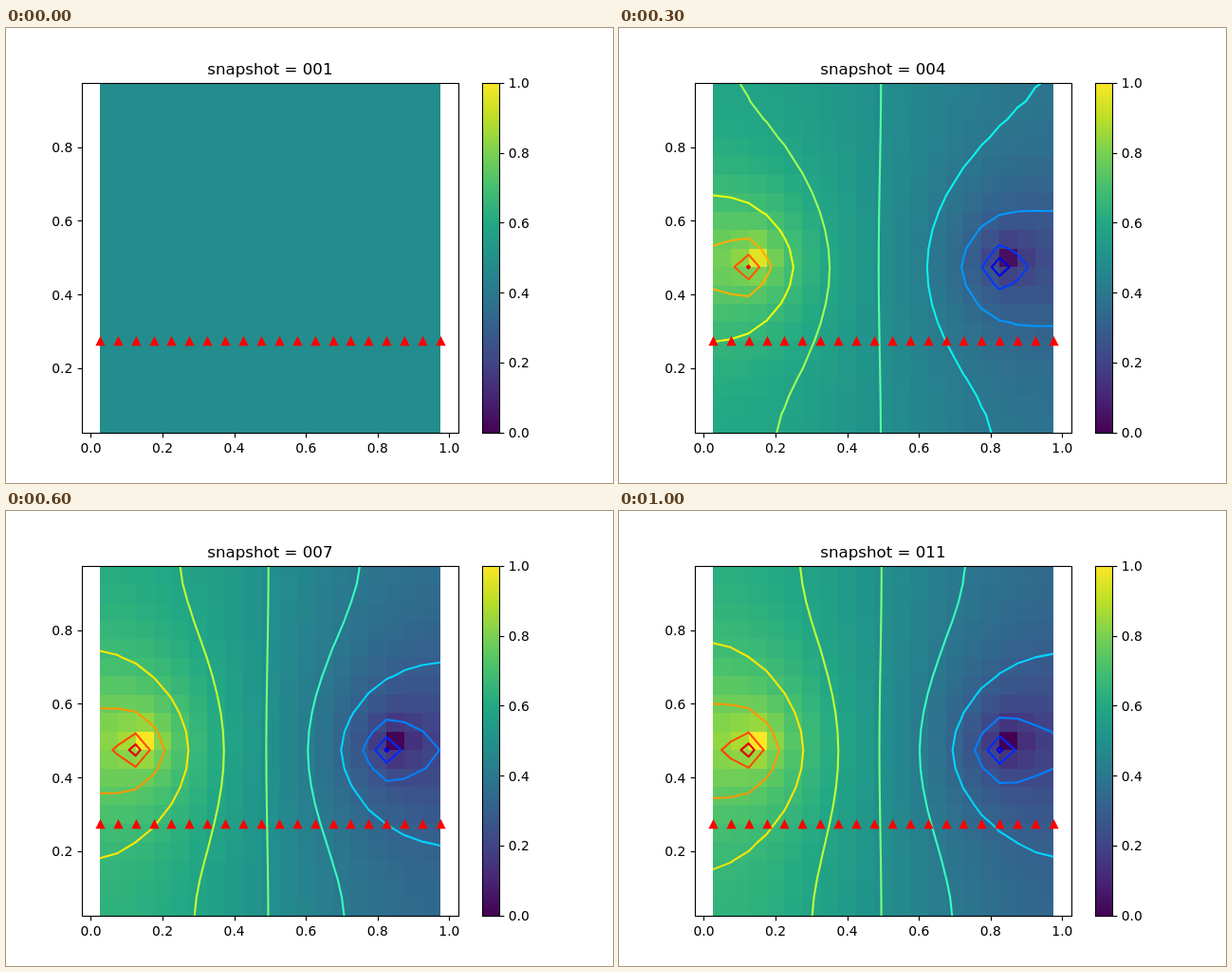
Animation of 640x480 px, one loop 1100 ms. Source, as an HTML page with a canvas:

```html
<!DOCTYPE html>
<html lang="en">
<head>
<meta charset="utf-8">
<title>Diffusion snapshots</title>
<style>
  html, body { margin: 0; width: 100%; height: 100%; overflow: hidden; background: #fff; }
  canvas, svg { position: absolute; left: 0; top: 0; }
  text { font: 13.89px "DejaVu Sans", Verdana, sans-serif; fill: #000; }
  #title { font-size: 16.67px; }
</style>
</head>
<body>
<canvas id="plot" width="640" height="480"></canvas>
<svg id="labels" width="640" height="480" viewBox="0 0 640 480">
  <text id="title" x="278.4" y="49" text-anchor="middle">snapshot = 001</text>
</svg>
<script>
const ctx = document.getElementById('plot').getContext('2d');
const labels = document.getElementById('labels');
const title = document.getElementById('title');

const STEP_MS = 100, STEPS = 11;
const N = 20;                              // nodes per side
const SOURCE = 2, SINK = 16, ROW = 9;      // wells, both on one row
const RATE = 27;                           // diffusion number of one time step
const LEVEL = 0.1503, MARGIN = 0.011;      // contour spacing, smallest overshoot drawn

const AX = { left: 80, right: 476.8, top: 57.6, bottom: 427.2 };
const BAR = { left: 501.6, right: 520.08, top: AX.top, bottom: AX.bottom };
const LINE = 1.11, TICK = 4.86;

const px = x => AX.left + (x + 0.025) * (AX.right - AX.left) / 1.05;
const py = y => AX.bottom - (y - 0.025) * (AX.bottom - AX.top) / 0.95;
const node = i => (i + 0.5) / N;
const snap = v => Math.floor(v + 0.5) + 0.5;
const range = n => Array.from({ length: n }, (_, i) => i);
const sum = (n, f) => { let s = 0; for (let i = 0; i < n; i++) s += f(i); return s; };

// Colour maps
const VIRIDIS = ['440154', '482475', '414487', '355f8d', '2a788e', '21918c',
  '22a884', '44bf70', '7ad151', 'bddf26', 'fde725']
  .map(h => [0, 2, 4].map(i => parseInt(h.slice(i, i + 2), 16)));

function viridis(v) {
  const s = Math.min(1, Math.max(0, v)) * 10, i = Math.min(9, Math.floor(s));
  const c = VIRIDIS[i].map((a, k) => Math.round(a + (VIRIDIS[i + 1][k] - a) * (s - i)));
  return `rgb(${c})`;
}

const JET = [
  [[0, 0], [0.35, 0], [0.66, 1], [0.89, 1], [1, 0.5]],
  [[0, 0], [0.125, 0], [0.375, 1], [0.64, 1], [0.91, 0], [1, 0]],
  [[0, 0.5], [0.11, 1], [0.34, 1], [0.65, 0], [1, 0]]
];

function jet(v) {
  const c = JET.map(stops => {
    const i = stops.findIndex(s => s[0] >= v) || 1;
    const [x0, y0] = stops[i - 1], [x1, y1] = stops[i];
    return Math.round(255 * (y0 + (y1 - y0) * (v - x0) / (x1 - x0)));
  });
  return `rgb(${c})`;
}

// Implicit diffusion in a closed box, solved exactly in cosine modes
const wave = range(N).map(k => range(N).map(i => Math.cos(Math.PI * k * node(i))));
const stiff = k => 2 - 2 * Math.cos(Math.PI * k / N);

function amplitude(p, q, n) {
  if (!p && !q) return 0;
  const e = stiff(p) + stiff(q);
  const weight = (p ? 2 : 1) * (q ? 2 : 1) / (N * N);
  const force = (wave[p][SOURCE] - wave[p][SINK]) * wave[q][ROW];
  return weight * force / e * (1 - Math.pow(1 + RATE * e, -n));
}

function solve(n) {
  const amp = range(N).map(p => range(N).map(q => amplitude(p, q, n)));
  const cols = range(N).map(p => range(N).map(j => sum(N, q => amp[p][q] * wave[q][j])));
  return range(N).map(j => range(N).map(i => sum(N, p => cols[p][j] * wave[p][i])));
}

const fields = range(STEPS).map(solve);
const bounds = f => [Math.min(...f.flat()), Math.max(...f.flat())];
const [LOW, HIGH] = bounds(fields[STEPS - 1]);

// Drawing
function drawMesh(f) {
  const xs = range(N).map(i => Math.round(px(node(i))));
  const ys = range(N).map(j => Math.round(py(node(j))));
  for (let j = 0; j < N - 1; j++) {
    for (let i = 0; i < N - 1; i++) {
      ctx.fillStyle = viridis((f[j][i] - LOW) / (HIGH - LOW));
      ctx.fillRect(xs[i], ys[j + 1], xs[i + 1] - xs[i], ys[j] - ys[j + 1]);
    }
  }
}

function traceLevel(f, level) {
  ctx.beginPath();
  for (let j = 0; j < N - 1; j++) {
    for (let i = 0; i < N - 1; i++) {
      const ring = [[i, j], [i + 1, j], [i + 1, j + 1], [i, j + 1]];
      const hits = [];
      ring.forEach(([ai, aj], k) => {
        const [bi, bj] = ring[(k + 1) % 4];
        const a = f[aj][ai] - level, b = f[bj][bi] - level;
        if (a > 0 === b > 0) return;
        const t = a / (a - b);
        hits.push([px(node(ai + (bi - ai) * t)), py(node(aj + (bj - aj) * t))]);
      });
      for (let k = 0; k + 1 < hits.length; k += 2) {
        ctx.moveTo(...hits[k]);
        ctx.lineTo(...hits[k + 1]);
      }
    }
  }
  ctx.stroke();
}

function drawContours(f) {
  const [min, max] = bounds(f);
  const top = Math.floor((max - MARGIN) / LEVEL);
  const bottom = -Math.floor((-min - MARGIN) / LEVEL);
  ctx.save();
  ctx.beginPath();
  ctx.rect(px(0.025), AX.top, px(0.975) - px(0.025), AX.bottom - AX.top);
  ctx.clip();
  ctx.lineWidth = 2.083;
  ctx.lineCap = ctx.lineJoin = 'round';
  for (let k = bottom; k <= top; k++) {
    ctx.strokeStyle = jet((k - bottom + 1) / (top - bottom + 2));
    traceLevel(f, k * LEVEL);
  }
  ctx.restore();
}

function drawMarkers() {
  ctx.fillStyle = ctx.strokeStyle = '#f00';
  ctx.lineWidth = 1.39;
  const y = Math.round(py(0.275)) + 0.5;
  for (let i = 0; i < N; i++) {
    const x = Math.round(px(node(i))) + 0.5;
    ctx.beginPath();
    ctx.moveTo(x, y - 4);
    ctx.lineTo(x - 4, y + 4);
    ctx.lineTo(x + 4, y + 4);
    ctx.closePath();
    ctx.fill();
    ctx.stroke();
  }
}

function line(x0, y0, x1, y1) {
  ctx.beginPath();
  ctx.moveTo(x0, y0);
  ctx.lineTo(x1, y1);
  ctx.stroke();
}

function drawFrame(b) {
  const x = snap(b.left), y = snap(b.top);
  ctx.strokeRect(x, y, snap(b.right) - x, snap(b.bottom) - y);
}

const barY = v => BAR.bottom - v * (BAR.bottom - BAR.top);
const TICKS = range(6).map(i => i / 5);
const INNER = TICKS.slice(1, 5);

function drawBar() {
  const g = ctx.createLinearGradient(0, BAR.bottom, 0, BAR.top);
  range(11).forEach(i => g.addColorStop(i / 10, viridis(i / 10)));
  ctx.fillStyle = g;
  ctx.fillRect(502, 58, 18, 369);
}

function drawAxes() {
  ctx.strokeStyle = '#000';
  ctx.lineWidth = LINE;
  drawFrame(AX);
  drawFrame(BAR);
  for (const v of TICKS) {
    const x = snap(px(v)), y = snap(barY(v));
    line(x, 427.5, x, 427.5 + TICK);
    line(520.5, y, 520.5 + TICK, y);
  }
  for (const v of INNER) line(80.5, snap(py(v)), 80.5 - TICK, snap(py(v)));
}

function addLabel(v, x, y, anchor) {
  const t = document.createElementNS('http://www.w3.org/2000/svg', 'text');
  t.setAttribute('x', x);
  t.setAttribute('y', y);
  t.setAttribute('text-anchor', anchor);
  t.textContent = v.toFixed(1);
  labels.append(t);
}

for (const v of TICKS) {
  addLabel(v, px(v), 448, 'middle');
  addLabel(v, 529.8, Math.round(barY(v) + 5.2), 'start');
}
for (const v of INNER) addLabel(v, 70.3, Math.round(py(v) + 5.2), 'end');

function draw(step) {
  ctx.fillStyle = '#fff';
  ctx.fillRect(0, 0, 640, 480);
  drawMesh(fields[step]);
  drawContours(fields[step]);
  drawMarkers();
  drawBar();
  drawAxes();
  title.textContent = 'snapshot = ' + String(step + 1).padStart(3, '0');
}

let shown = -1;
function tick() {
  const step = Math.floor(performance.now() / STEP_MS) % STEPS;
  if (step !== shown) draw(shown = step);
  requestAnimationFrame(tick);
}
tick();
</script>
</body>
</html>
```
